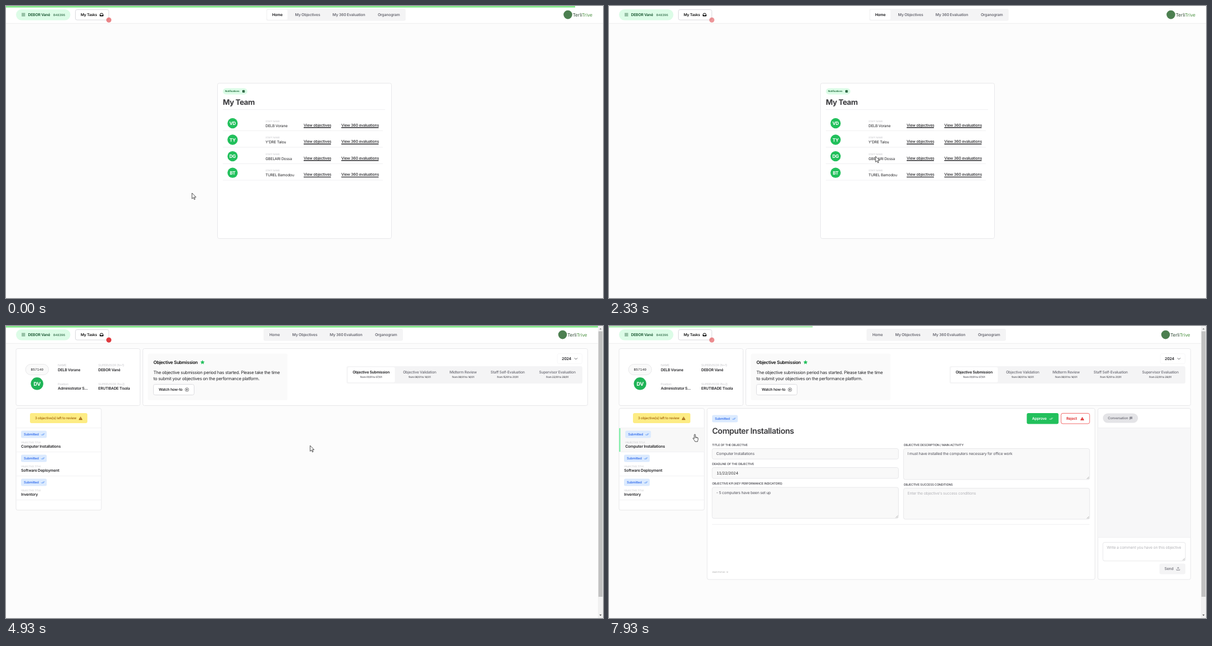
Recreate the animation shown at these times as an HTML page. Size 1071 by 523 pixels, loop 8000 ms.

```html
<!DOCTYPE html>
<html lang="en">
<head>
<meta charset="utf-8">
<title>Performance dashboard</title>
<style>
html, body { margin: 0; width: 100%; height: 100%; overflow: hidden; background: #fcfcfc; }
svg { display: block; width: 100vw; height: 100vh; }
text { font-family: Inter, sans-serif; letter-spacing: -.03em; text-rendering: geometricPrecision; white-space: pre; }
.mono { font-family: "Liberation Mono", monospace; letter-spacing: 0; }
.logo { font-family: "Open Sans", sans-serif; letter-spacing: 0; }
.tab { font-variant-numeric: tabular-nums; }
</style>
</head>
<body>
<svg id="stage" viewBox="0 0 1071 523"></svg>
<script>
const LOOP = 8000, PAGE = 3800, CONTENT = 4730, DETAIL = 7330;
const INK = '#27272a', GRAY = '#6b6b74', PALE = '#c6c6ca', LINE = '#e2e2e5', GREEN = '#22c05c', DEEP = '#14532d';
const OWNER = 'DEBOR Vané', STAFF = 'DELB Vorane';

// Drawing helpers
const text = (x, y, s, size = 6.9, fill = INK, weight = 400, extra = '') =>
  `<text x="${x}" y="${y}" font-size="${size}" fill="${fill}" font-weight="${weight}" ${extra}>${s}</text>`;
const mid = (x, y, s, size, fill, weight, extra = '') =>
  text(x, y, s, size, fill, weight, 'text-anchor="middle" ' + extra);
const rect = (x, y, x2, y2, fill, r = 0, stroke = 'none', extra = '') =>
  `<rect x="${x}" y="${y}" width="${x2 - x}" height="${y2 - y}" rx="${r}" fill="${fill}" stroke="${stroke}" stroke-width=".8" ${extra}/>`;
const card = (x, y, x2, y2) => rect(x, y, x2, y2, '#fff', 3, LINE);
const circle = (x, y, r, fill, extra = '') => `<circle cx="${x}" cy="${y}" r="${r}" fill="${fill}" ${extra}/>`;
const path = (d, stroke, w = .8, fill = 'none', extra = '') =>
  `<path d="${d}" stroke="${stroke}" stroke-width="${w}" fill="${fill}" ${extra}/>`;
const rule = (x, x2, y) => path(`M${x} ${y}H${x2}`, '#ededef', .8);
const group = (id, body, extra = '') => `<g id="${id}" ${extra}>${body}</g>`;

// Small icons
const checks = (x, y, c) => path(`M${x} ${y}l1.5 1.5l2.8-3.2M${x + 3} ${y + 1.1}l.4.4l2.8-3.2`, c, .75);
const warn = (x, y, c) => path(`M${x} ${y - 2.6}l3 5.2h-6z`, c, .6, c, 'stroke-linejoin="round"') +
  path(`M${x} ${y - 1}v1.7m0 .7v.6`, '#fff', .6);
const badge = (x, y) => rect(x, y, x + 46, y + 13, '#dbeafe', 2.5) +
  text(x + 5, y + 8.6, 'Submitted', 5.8, '#2563eb', 500) + checks(x + 36, y + 6.6, '#3b82f6');
const star = (x, y, r) => {
  let d = '';
  for (let i = 0; i < 10; i++) {
    const a = i * Math.PI / 5, q = i % 2 ? r * .48 : r;
    d += `${i ? 'L' : 'M'}${(x + q * Math.sin(a)).toFixed(2)} ${(y - q * Math.cos(a)).toFixed(2)}`;
  }
  return path(d + 'Z', GREEN, .5, GREEN, 'stroke-linejoin="round"');
};

function header() {
  const nav = [['Home', 486.8], ['My Objectives', 541], ['My 360 Evaluation', 615], ['Organogram', 686.7]];
  const items = nav.map(([s, x], i) => mid(x, 18, s, 6.9, GRAY, 600, `id="nav${i}"`)).join('');
  return rect(0, 0, 1071, 31, '#fff') + path('M0 31.3H1071', '#e9e9eb', .8) +
    rect(18, 6, 115.5, 25.5, '#dcfce7', 9.7) +
    path('M28 13.3h6.4M28 15.5h6.4M28 17.7h6.4', DEEP, .75) +
    text(39.5, 18, OWNER, 6.8, DEEP, 600) +
    text(85, 17.9, 'B48396', 5.85, DEEP, 400, 'class="mono"') +
    rect(124.5, 6.5, 184.5, 25, '#fff', 3, '#d0d0d5') +
    text(134, 18, 'My Tasks', 6.7, '#111', 600) +
    path('M168.5 15.6l1.1-2.4h3.6l1.1 2.4v2.3h-5.8z', '#111', 1, 'none', 'stroke-linejoin="round"') +
    path('M168.5 15.9h1.7l.6 1h1.2l.6-1h1.7v2h-5.8z', '#111', .3, '#111') +
    group('nav', rect(467, 5, 717, 26.5, '#f4f4f5', 3) + rect(468.5, 6.8, 505, 24.6, '#fff', 2.5, 'none', 'id="active"') + items) +
    group('brand', circle(1008, 15.6, 7.8, '#4c7f50') +
      text(1017, 18.8, 'Terli<tspan fill="#3f8a35">Trive</tspan>', 8.4, '#1f3a24', 500, 'class="logo"')) +
    circle(184.5, 25.1, 4.6, '#dc2f35', 'id="dot"');
}

const rows = [['VD', STAFF], ['TY', "Y'DRE Talou"], ['DG', 'GBELARI Dossa'], ['BT', 'TUREL Bamodou']];
const links = [];

function team() {
  let s = card(379.5, 138.3, 691.5, 416.5) + rect(389, 147.3, 433, 158.5, '#dcfce7', 5.6) +
    text(393, 154.4, 'Notifications', 4.4, '#166534', 600) +
    rect(424, 150.8, 428.4, 155.1, '#14532d', .8) + path('M425 153.6l1-1 1 .8 1-1.2', '#dcfce7', .5) +
    text(389, 176.6, 'My Team', 13.4, '#3a3a3d', 700) + rule(389, 680, 185.5);
  rows.forEach(([initials, name], i) => {
    const y = 29.55 * i;
    s += circle(406.5, 210 + y, 9.2, GREEN) + mid(406.5, 213 + y, initials, 8.2, '#fff', 700) +
      text(465.5, 207.5 + y, 'STAFF NAME', 4.25, PALE) + text(465.5, 216.7 + y, name, 6.75) +
      rule(389, 676, 223.4 + y);
    [['View objectives', 534, 583], ['View 360 evaluations', 601.5, 668.5]].forEach(([label, x, x2]) => {
      const id = 'link' + links.length;
      links.push({ id, x, x2, y: 207 + y, y2: 219 + y });
      s += group(id, text(x, 215.6 + y, label, 7, 'currentColor', 500) +
        path(`M${x} ${217.7 + y}H${x2}`, 'currentColor', 1.4), `color="${INK}"`);
    });
  });
  return s;
}

function profile() {
  const field = (x, y, label, value) => text(x, y, label, 5.4, PALE) + text(x, y + 8.9, value, 6.8, INK, 600);
  return card(18, 40.5, 240.5, 142.5) + rect(35, 68.5, 76.5, 87.5, '#fafafa', 9.5, LINE) +
    mid(55.7, 80.2, 'B57140', 6.25, INK, 400, 'class="mono"') +
    circle(55.7, 103.3, 11.2, '#1fb457') + mid(55.7, 106.6, 'DV', 9.2, '#fff', 700) +
    field(93, 72, 'NAME', STAFF) + field(165.5, 72, 'SUPERVISOR (N+1)', OWNER) +
    field(93, 105.5, 'Position', 'Administrator S...') + field(165.5, 105.5, 'SUPERVISOR (N+2)', 'ERUTIBADE Tisola');
}

function period() {
  const tabs = [['Objective Submission', 655, '01/01 to 07/01'], ['Objective Validation', 742, '08/01 to 14/01'],
    ['Midterm Review', 820, '08/01 to 14/01'], ['Staff Self-Evaluation', 900, '15/01 to 21/01'],
    ['Supervisor Evaluation', 989, '22/01 to 28/01']];
  return card(245.5, 40.5, 1043.5, 142.5) + rect(254.5, 49.5, 505, 133, '#fafafa', 3) +
    text(264.5, 67.6, 'Objective Submission', 8.05, '#111', 600) + star(352.5, 65.1, 3.6) +
    text(264.5, 86.1, 'The objective submission period has started. Please take the time', 7.8) +
    text(264.5, 97.2, 'to submit your objectives on the performance platform.', 7.8) +
    rect(264.5, 104.5, 337.5, 123.5, '#fff', 3, '#d4d4d8') + text(274, 116.3, 'Watch how-to', 6.65, INK, 600) +
    circle(324.6, 114, 3.2, 'none', `stroke="${INK}" stroke-width=".6"`) + path('M323.8 112.7l2 1.3-2 1.3z', INK, .4, INK) +
    rect(989, 49.5, 1033.5, 67.5, '#fff', 3, '#f5f5f6') + text(997, 61, '2024', 7, INK, 600) +
    path('M1019.8 57.2l2.6 2.6 2.6-2.6', INK, .75) +
    rect(611, 72, 1034, 103, '#f4f4f5', 3) + rect(613, 73.8, 697.5, 101, '#fff', 2.5) +
    tabs.map(([s, x, d], i) => mid(x, 85.4, s, 6.7, i ? GRAY : '#18181b', i ? 500 : 600) +
      mid(x, 93.2, 'from ' + d, 4.6, '#3f3f46', 500)).join('');
}

function list() {
  return card(18, 147.5, 171, 329.8) + rect(43, 156, 146, 174, '#fdec84', 3) +
    text(52, 167.1, '3 objective(s) left to review', 6.15, '#a16207', 500) + warn(133.8, 165.3, '#a16207') +
    rect(18.4, 183, 170.6, 225.4, '#f8f8f8', 0, 'none', 'id="rowBack"') +
    rect(18, 183, 20.5, 225.4, '#86efac', 0, 'none', 'id="rowMark"') + rule(18.4, 170.6, 182.6) +
    ['Computer Installations', 'Software Deployment', 'Inventory'].map((s, i) => {
      const y = 43 * i;
      return group('row' + i, badge(27, 187.6 + y) + text(27, 209.5 + y, 'OBJECTIVE TITLE', 4.4, PALE) +
        text(27, 218.4 + y, s, 6.95, INK, 600)) + rule(18.4, 170.6, 225.6 + y);
    }).join('');
}

function detail() {
  const grip = (x, y) => path(`M${x - 5} ${y - 1}l4-4M${x - 2.7} ${y - 1}l1.7-1.7`, '#777', .55);
  const box = (x, y, x2, y2, fill = '#f9f9f9') => rect(x, y, x2, y2, fill, 3, LINE) + (y2 - y > 25 ? grip(x2, y2) : '');
  const label = (x, y, s) => text(x, y, s, 5.4, '#3f3f46', 500);
  const value = (x, y, s, c = '#52525b', extra = '') => text(x, y, s, 6.9, c, 400, extra);
  const left = card(176, 147.5, 871.8, 454) + badge(185, 159.6) +
    text(185, 193.2, 'Computer Installations', 14.3, '#3a3a3d', 600) +
    rect(749.5, 156, 806.5, 175.4, GREEN, 3) + text(759, 168.1, 'Approve', 6.7, '#fff', 600) + checks(790, 166, '#fff') +
    rect(811, 156.4, 862.2, 175, '#fff', 3, '#ef4444') + text(820.5, 168.1, 'Reject', 6.7, '#dc2626', 600) + warn(849, 166, '#dc2626') +
    label(185, 215, 'TITLE OF THE OBJECTIVE') + box(185, 219.5, 519.3, 238.3) + value(192.5, 231.3, 'Computer Installations') +
    label(185, 249, 'DEADLINE OF THE OBJECTIVE') + box(185, 253.5, 519.3, 273) + value(193, 265.8, '11/22/2024', INK, 'class="tab"') +
    label(185, 284.2, 'OBJECTIVE KPI (KEY PERFORMANCE INDICATORS)') + box(185, 289, 519.3, 344.5) +
    value(192.5, 300.5, '- 5 computers have been set up') +
    label(528.5, 215, 'OBJECTIVE DESCRIPTION / MAIN ACTIVITY') + box(528.5, 219.5, 862.2, 275) +
    value(535.5, 231.3, 'I must have installed the computers necessary for office work') +
    label(528.5, 286, 'OBJECTIVE SUCCESS CONDITIONS') + box(528.5, 290.5, 862.2, 346) +
    value(535.5, 302.2, "Enter the objective's success conditions", '#b4b4b9') +
    rule(185, 862, 355.4) + text(185, 442.4, 'OBJECTIVE NO : 12', 3.3, '#999');
  const right = card(877, 147.5, 1043.5, 454) + rect(886, 156.4, 949, 173.6, '#e4e4e7', 8.6) +
    text(895, 167.2, 'Conversation', 6.05, GRAY, 500) + path('M934.4 168v-5h4.4l-1 1.5 1 1.5h-4.4', GRAY, .7, '#a1a1aa') +
    rect(877.4, 182.5, 1043.1, 378.5, '#f7f7f8') + rule(877.4, 1043.1, 182.5) + rule(877.4, 1043.1, 378.5) +
    box(886, 387.6, 1034, 420.8, '#fff') + value(893, 399.3, 'Write a comment you have on this objective', '#b4b4b9') +
    rect(987.5, 425.5, 1034, 444.5, '#f4f4f5', 3) + text(996.5, 437.3, 'Send', 6.9, GRAY, 500) +
    path('M1021 436.2v-4M1019.3 433.7l1.7-1.7 1.7 1.7M1018.2 435.4v2h5.6v-2', GRAY, .7);
  return left + right;
}

const scrollbar = rect(1062, 0, 1071, 523, '#f1f1f1') + rect(1062.8, 9.5, 1070.2, 485, '#c1c1c1') +
  path('M1064.5 6.2h4l-2-2.4z', 'none', 0, '#8a8a8a') + path('M1064.5 516.8h4l-2 2.4z', 'none', 0, '#505050');
const arrow = path('M0 0V10.2L2.4 8L4 11.6L5.6 10.9L4 7.4H7.2Z', '#222', .8, '#fff', 'stroke-linejoin="round"');
const hand = path('M-1 1a1 1 0 0 1 2 0V5l3.4.6q1.4.3 1.4 1.7V9q0 1.5-.8 2.6V13h-4.7q-.3-1.4-1.7-2.9l-1.9-2.5q-.3-1.1.8-1l1.5 1.1z',
  '#222', .8, '#fff', 'stroke-linejoin="round"') + path('M1 5v2.2M2.7 5.5v1.7M4.3 5.8v1.6', '#222', .5);

document.getElementById('stage').innerHTML = rect(0, 0, 1071, 523, '#fcfcfc') + header() + group('team', team()) +
  group('board', profile() + period() + list()) + group('detail', detail()) +
  rect(0, 0, 1, 2.8, '#86e98c', 0, 'none', 'id="bar"') + group('scroll', scrollbar) + group('arrow', arrow) + group('hand', hand);

// Motion
const el = id => document.getElementById(id);
const set = (id, key, v) => el(id).setAttribute(key, v);
const show = (id, on) => set(id, 'visibility', on ? 'visible' : 'hidden');
const move = (id, x, y) => set(id, 'transform', `translate(${x} ${y})`);

// Each key is [time, value, ...]; values are interpolated in between.
function at(keys, t) {
  let i = 0;
  while (i < keys.length - 2 && t >= keys[i + 1][0]) i++;
  const a = keys[i], b = keys[i + 1], k = Math.min(1, Math.max(0, (t - a[0]) / (b[0] - a[0])));
  return a.slice(1).map((v, j) => v + (b[j + 1] - v) * k);
}

const pointer = [[930, 333.7, 335], [1270, 341.7, 315], [1730, 373, 291], [1800, 380, 282], [2200, 455, 268],
  [2600, 526, 272], [2800, 606, 288], [2950, 618, 270], [3200, 545.6, 214.2], [5600, 545.6, 214.2], [5870, 466, 187],
  [6250, 230, 180], [6650, 89.3, 191.5], [6740, 89.3, 191.5], [6930, 100, 199.5], [7300, 100, 199.5], [7930, 154, 194]];
const load = [[0, .953], [150, 1], [3560, 1], [3561, 0], [3850, .08], [4200, .08], [4400, .114], [4720, .2],
  [4900, 1], [6780, 1], [6781, 0], [6920, .08], [7080, .08], [7300, .18], [7600, .27], [7930, .344]];
const glow = [[0, 1], [300, 1], [750, 0], [3560, 0], [3561, 1], [5150, 1], [5650, 0], [6780, 0], [6781, 1], [7700, 1], [7930, .65]];

function draw(t) {
  const second = t >= PAGE, board = t >= CONTENT, open = t >= DETAIL;
  show('team', !second);
  show('board', board);
  show('detail', open);
  show('scroll', second);
  show('active', !second);
  set('nav0', 'fill', second ? GRAY : '#18181b');
  move('nav', second ? -5 : 0, 0);
  move('brand', second ? -9.5 : 0, 0);

  const [x, y] = at(pointer, t);
  let over = false;
  links.forEach(l => {
    const hit = !second && x > l.x && x < l.x2 && y > l.y && y < l.y2;
    over = over || hit;
    set(l.id, 'color', hit ? '#77777f' : INK);
    el(l.id).lastChild.setAttribute('stroke-width', hit ? .8 : 1.4);
  });
  const onRow = board && x > 18 && x < 171 && y > 183 && y < 225;
  show('rowBack', onRow || open);
  show('rowMark', open);
  move('row0', open ? 2.2 : 0, 0);
  show('hand', over || onRow);
  show('arrow', !over && !onRow);
  move('hand', x, y);
  move('arrow', x, y);

  set('bar', 'width', at(load, t)[0] * (second ? 1062 : 1071));
  set('bar', 'opacity', at(glow, t)[0]);

  // The dot breathes every two seconds and restarts with the new page.
  const phase = (t - (board ? CONTENT : 1270) + 4000) % 2000 / 1000;
  const p = phase < 1 ? phase : 2 - phase;
  set('dot', 'opacity', 1 - .5 * p * p * (3 - 2 * p));
}

function tick() {
  draw(performance.now() % LOOP);
  requestAnimationFrame(tick);
}
tick();
</script>
</body>
</html>
```
